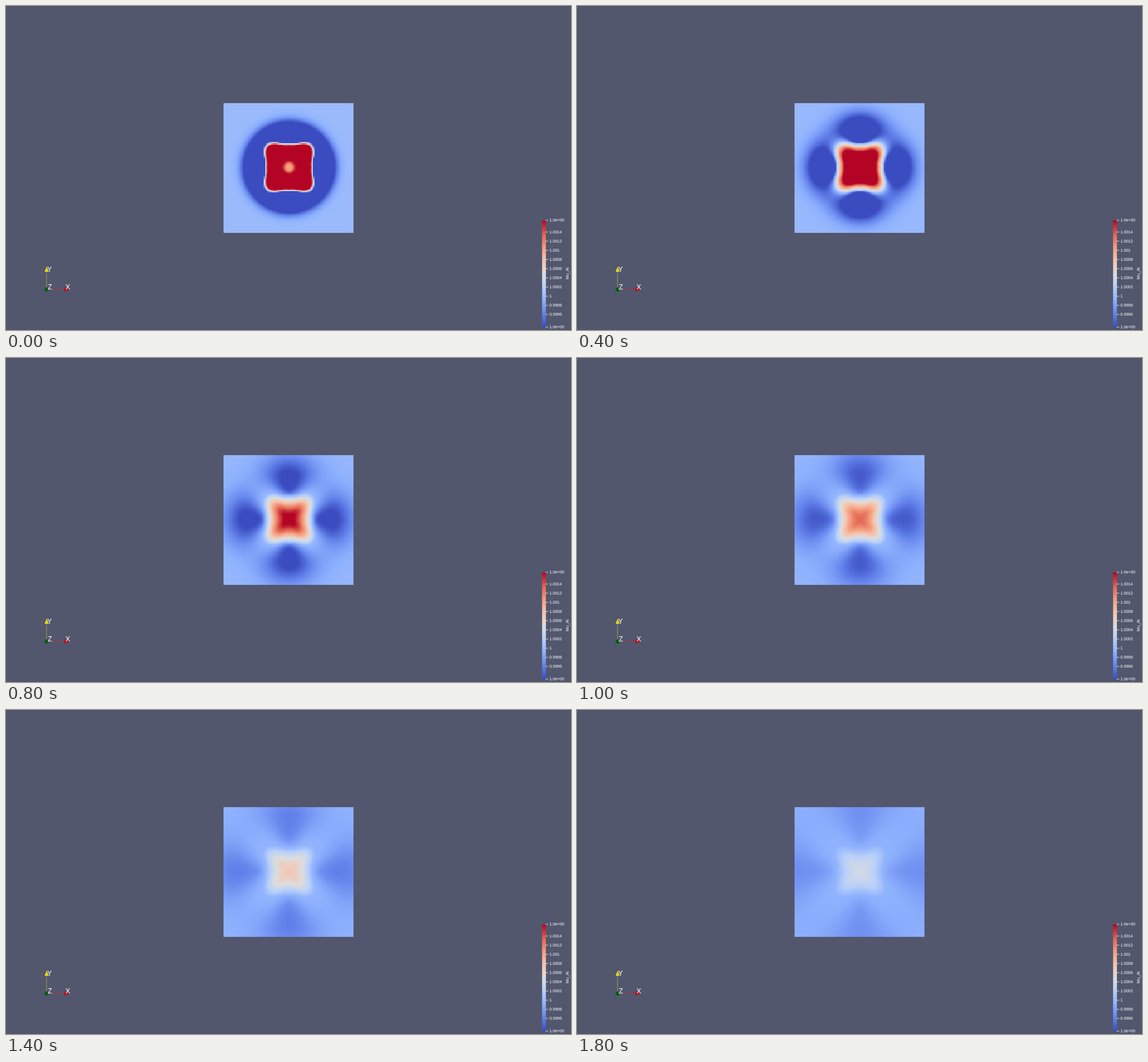
An HTML page with a canvas for the animation above (2 s loop, 987 by 567 pixels).

```html
<!DOCTYPE html>
<html lang="en">
<head>
<meta charset="utf-8">
<title>Diffusion field</title>
<style>
  html, body { margin: 0; width: 100%; height: 100%; overflow: hidden; background: #52576e; }
  svg, canvas { position: absolute; left: 0; top: 0; display: block; }
  text { font-family: "Liberation Sans", Arial, sans-serif; fill: #fff; }
</style>
</head>
<body>
<canvas id="stage" width="987" height="567"></canvas>
<svg width="987" height="567" viewBox="0 0 987 567">
  <defs><linearGradient id="ramp" x1="0" y1="1" x2="0" y2="0"></linearGradient></defs>
  <g id="axes" font-size="12.5">
    <path d="M70.8 496V464" stroke="#a39c4e"/>
    <path d="M71 456.3L74.6 465H67.4Z" fill="#e6e000"/>
    <path d="M71 495.8H103" stroke="#b83040"/>
    <path d="M110.5 496L102 492.3V499.7Z" fill="#c80008"/>
    <circle cx="71" cy="496" r="3.7" fill="#005f10"/>
    <text x="71.8" y="465.3">Y</text>
    <text x="103.8" y="496.3">X</text>
    <text x="72.8" y="496">Z</text>
  </g>
  <g id="legend" font-size="7.1">
    <rect x="936.5" y="375" width="6.7" height="187" fill="url(#ramp)"/>
    <text font-size="7.4" text-anchor="middle" transform="translate(983 468) rotate(-90)">Mu_Al</text>
  </g>
</svg>
<script>
const STEP = 200, STEPS = 10, CELLS = 100, CELL = 2.265;

// Diverging blue-white-red ramp, evenly spaced
const RAMP = [[59, 76, 192], [98, 130, 234], [141, 176, 254], [184, 208, 249], [221, 221, 221],
              [245, 196, 173], [244, 154, 123], [222, 96, 77], [180, 4, 38]];

const { exp, cos, hypot, min, max, floor, PI } = Math;
const mix = (a, b, k) => a + (b - a) * k;
const clamp = v => min(1, max(0, v));

function color(v) {
  const p = clamp(v) * (RAMP.length - 1), i = min(RAMP.length - 2, floor(p));
  return RAMP[i].map((c, n) => Math.round(mix(c, RAMP[i + 1][n], p - i)));
}

// Field at time t (in steps): a decaying four-cornered core inside a spreading moat
function fieldAt(t) {
  const base = .29 - .0035 * t;
  const peak = 2.24 * exp(-.27 * t) + 3.5 * exp(-1.6 * t);
  const tip = 17 - 3 * exp(-2 * t);
  const depth = .66 / (1 + (t / 3.8) ** 2);
  const diagonal = .3 + .7 * exp(-((t / 1.5) ** 2));
  const soft = 1 + .25 * t * t;
  const rim = 64 + .5 * t * t, spread = 17.5 + 5.5 * t;
  const seed = .27 * exp(-6 * t);

  return (x, y) => {
    const r = hypot(x, y);
    const u = r ? (2 * x * y / (r * r)) ** 2 : 0; // 0 on the axes, 1 on the diagonals
    const edge = 41.5 + tip * u ** 1.6;
    if (r < edge) {
      const core = clamp(base + peak * cos(PI / 2 * r / edge));
      return core - seed * exp(-((r / 9) ** 4));
    }
    const rise = 1 - exp((edge - r) / (soft * (1 + 2.5 * u)));
    const fall = exp(-((max(0, r - rim) / spread) ** 2));
    return base - depth * mix(1, diagonal, u) * rise * fall;
  };
}

function render(t) {
  const field = fieldAt(t);
  const tile = document.createElement("canvas");
  tile.width = tile.height = CELLS;
  const g = tile.getContext("2d"), img = g.createImageData(CELLS, CELLS);
  for (let j = 0; j < CELLS; j++) {
    for (let i = 0; i < CELLS; i++) {
      const v = field((i - 50) * CELL, (j - 49) * CELL);
      img.data.set([...color(v), 255], (j * CELLS + i) * 4);
    }
  }
  g.putImageData(img, 0, 0);
  return tile;
}

function add(parent, name, attrs, label = "") {
  const el = document.createElementNS("http://www.w3.org/2000/svg", name);
  for (const k in attrs) el.setAttribute(k, attrs[k]);
  el.textContent = label;
  parent.appendChild(el);
}

function buildLegend() {
  const ramp = document.getElementById("ramp"), legend = document.getElementById("legend");
  for (let i = 0; i <= 32; i++) {
    add(ramp, "stop", { offset: i / 32, "stop-color": `rgb(${color(i / 32)})` });
  }
  const tick = (y, label) => {
    add(legend, "path", { d: `M942.5 ${y}H947`, stroke: "#fff", "stroke-width": .8 });
    add(legend, "text", { x: 949.3, y: y + 2.2 }, label);
  };
  tick(375, "1.0e+00");
  for (let i = 0; i < 10; i++) tick(395.5 + i * 16.05, String(+(1.0014 - i * .0002).toFixed(4)));
  tick(562, "1.0e+00");
}

buildLegend();
const tiles = Array.from({ length: STEPS }, (_, t) => render(t));
const ctx = document.getElementById("stage").getContext("2d");
ctx.imageSmoothingEnabled = false;
let shown = -1;

function draw() {
  const step = floor(performance.now() / STEP) % STEPS;
  if (step !== shown) {
    ctx.clearRect(0, 0, 987, 567);
    ctx.drawImage(tiles[step], 379.9, 169.9, 226.9, 226.9);
    shown = step;
  }
  requestAnimationFrame(draw);
}
draw();
</script>
</body>
</html>
```
